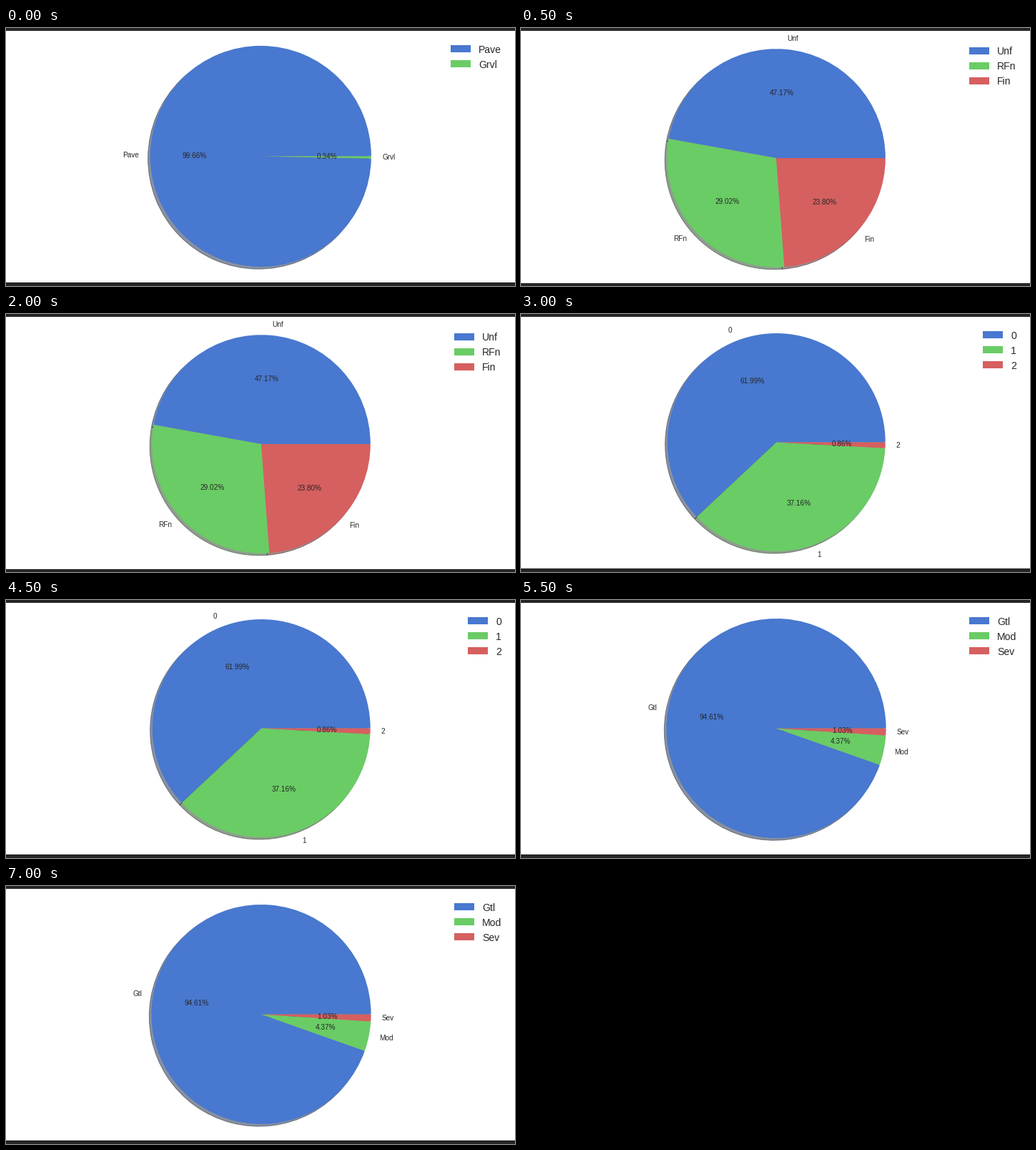
Recreate the animation shown at these times as a matplotlib script. Size 712x361 px, loop 8000 ms.

```python
import math

import matplotlib.pyplot as plt
from matplotlib.animation import FuncAnimation
from matplotlib.patches import Rectangle, Wedge

W, H, DPI = 712, 361, 64
PX = 72 / DPI  # points per pixel
INK = "#262626"
BAR = "#262427"
COLORS = ["#4878CF", "#6ACC65", "#D65F5F"]
STEP = 500  # ms per frame

# start step, pie centre and radius, bottom bar top, legend x / y / baseline, slices
PIES = [
    dict(start=0, pie=(356.3, 179.5, 154.6), bar=356, legend=(622, 24, 35),
         slices=[("Pave", 99.66), ("Grvl", 0.34)]),
    dict(start=1, pie=(357.0, 182.0, 152.8), bar=357, legend=(627, 27, 37),
         slices=[("Unf", 47.17), ("RFn", 29.02), ("Fin", 23.80)]),
    dict(start=6, pie=(357.2, 179.5, 152.5), bar=356, legend=(646, 24, 35),
         slices=[("0", 61.99), ("1", 37.16), ("2", 0.86)]),
    dict(start=11, pie=(357.0, 179.6, 153.6), bar=356, legend=(627, 24, 35),
         slices=[("Gtl", 94.61), ("Mod", 4.37), ("Sev", 1.03)]),
]

plt.rcParams["font.family"] = "Liberation Sans"
fig = plt.figure(figsize=(W / DPI, H / DPI), dpi=DPI, facecolor="white")
ax = fig.add_axes([0, 0, 1, 1])
ax.set_xlim(0, W)
ax.set_ylim(0, H)
ax.axis("off")


def rect(x, top, w, h, color):
    return ax.add_patch(Rectangle((x, H - top - h), w, h, fc=color, lw=0))


def text(x, y, s, size, ha, va):
    return ax.text(x, y, s, fontsize=size * PX, color=INK, ha=ha, va=va)


def shade(color):
    return [0.3 * int(color[i:i + 2], 16) / 255 for i in (1, 3, 5)]


def build(spec):
    cx, top, r = spec["pie"]
    cy = H - top
    lx, ly, base = spec["legend"]
    total = sum(v for _, v in spec["slices"])
    art = [rect(0, spec["bar"], W, H - spec["bar"], BAR)]
    angle = 0
    for i, ((name, value), color) in enumerate(zip(spec["slices"], COLORS)):
        end = angle + 360 * value / total
        mid = math.radians((angle + end) / 2)
        dx, dy = r * math.cos(mid), r * math.sin(mid)
        dark = shade(color)
        off = 0.02 * r
        art += [
            ax.add_patch(Wedge((cx - off, cy - off), r, angle, end, fc=dark,
                               ec=dark, alpha=0.5, lw=PX, zorder=1)),
            ax.add_patch(Wedge((cx, cy), r, angle, end, fc=color, lw=0,
                               zorder=2)),
            text(cx + 1.1 * dx, cy + 1.1 * dy, name, 10,
                 "left" if dx > 0 else "right", "center"),
            text(cx + 0.6 * dx, cy + 0.6 * dy, f"{value:.2f}%", 10,
                 "center", "center"),
            rect(lx, ly + 21 * i, 28, 10, color),
            text(lx + 39.2, H - base - 21 * i, name, 14, "left", "baseline"),
        ]
        angle = end
    return art


rect(0, 0, W, 4, BAR)
groups = [build(spec) for spec in PIES]


def draw(step):
    current = max(i for i, spec in enumerate(PIES) if spec["start"] <= step)
    for i, group in enumerate(groups):
        for artist in group:
            artist.set_visible(i == current)
    return []


anim = FuncAnimation(fig, draw, frames=8000 // STEP, interval=STEP,
                     repeat=True, repeat_delay=0)
plt.show()
```
